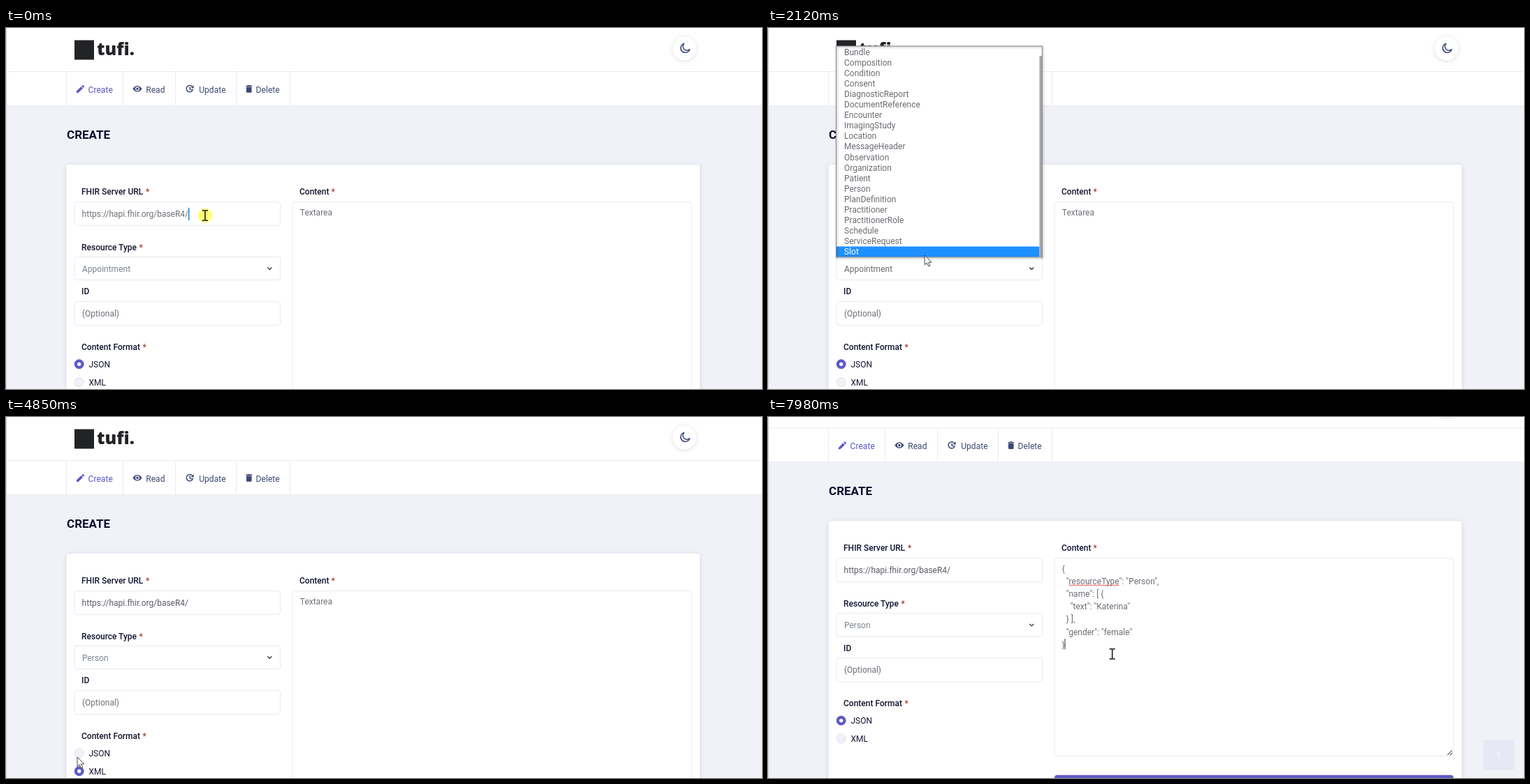
Animation of 1082 by 518 pixels, one loop 8000 ms. Source, as an HTML page:

```html
<!DOCTYPE html>
<html lang="en">
<head>
<meta charset="utf-8">
<title>Create resource</title>
<style>
  html, body { margin: 0; width: 100%; height: 100%; overflow: hidden; background: #f1f2f8; }
  svg { display: block; width: 1082px; height: 518px; font: 12px Roboto, sans-serif; }
  text { white-space: pre; }
  .label { font-weight: 500; fill: #12142f; }
  .star { fill: #b03a2e; }
  .field { fill: #fff; stroke: #e9eaf1; }
  .rule { stroke: #ebecf1; fill: none; }
  .value { fill: #6d6f77; }
  .icon { fill: none; stroke: #3d4976; stroke-width: 1.5; }
  .shadow { filter: drop-shadow(0 1px 3px rgba(40, 50, 90, .16)); }
</style>
</head>
<body>
<svg viewBox="0 0 1082 518">
  <defs>
    <clipPath id="selClip"><rect id="selClipBox" y="258" height="18"/></clipPath>
    <clipPath id="listClip"><rect x="98" y="26.5" width="294" height="302.5"/></clipPath>
  </defs>
  <rect width="1082" height="518" fill="#f1f2f8"/>

  <g id="page">
    <rect width="1082" height="111" fill="#fff"/>
    <path class="rule" d="M0 62.5H1082M0 111.5H1082"/>
    <rect x="98" y="17.5" width="28" height="28" fill="#222326"/>
    <text x="130" y="39" font-family="Open Sans, sans-serif" font-weight="800" font-size="25" fill="#222326">tufi.</text>
    <circle class="shadow" cx="971" cy="29.5" r="17" fill="#fff"/>
    <path class="icon" d="M970.4 22.4A6.6 6.6 0 1 0 978.6 30.6A5.8 5.8 0 0 1 970.4 22.4Z" stroke-linejoin="round"/>

    <g id="nav"></g>
    <g fill="#5a54c4">
      <path d="M101 90.6L107.6 84L110 86.4L103.4 93H101ZM108.3 83.3L109.5 82.1Q110 81.7 110.5 82.1L111.9 83.5Q112.3 84 111.9 84.5L110.7 85.7Z"/>
    </g>
    <path d="M181.4 87.3Q184.2 83 188 83T194.6 87.3Q191.8 91.6 188 91.6T181.4 87.3Z" fill="#3d4976"/>
    <circle cx="188" cy="87.3" r="2.4" fill="#3d4976" stroke="#fff" stroke-width="1.2"/>
    <path class="icon" d="M267.6 87.7A4.7 4.7 0 1 1 266.4 83.9M263.2 84.6V87.6L265.8 89.1" stroke-width="1.2"/>
    <path d="M268.6 82V86.2H264.4Z" fill="#3d4976"/>
    <path d="M343.4 82.6H345.8L346.4 82H349.2L349.8 82.6H352.2V83.9H343.4ZM344 84.5H351.6V91.5Q351.6 92.7 350.4 92.7H345.2Q344 92.7 344 91.5Z" fill="#3d4976"/>

    <text x="87" y="158.7" font-size="17" font-weight="600" fill="#0f1130">CREATE</text>
    <rect class="shadow" x="86.5" y="196" width="906.5" height="500" rx="4" fill="#fff"/>

    <g id="labels"></g>
    <rect class="field" x="98" y="249.5" width="294.5" height="34" rx="4"/>
    <rect class="field" x="98" y="328.5" width="294.5" height="33" rx="3"/>
    <rect class="field" x="98" y="392.5" width="294.5" height="34" rx="4"/>
    <rect class="field" x="410" y="249.5" width="571" height="283.5" rx="4"/>
    <path d="M972.5 531.5L979 525M976 532L979.5 528.5" stroke="#555" stroke-width="1.1"/>

    <text id="url" x="108.6" y="270.6">https://hapi.fhir.org/baseR4/</text>
    <rect id="selBox" y="258" height="18" fill="#0078d7"/>
    <text x="108.6" y="270.6" fill="#fff" clip-path="url(#selClip)">https://hapi.fhir.org/baseR4/</text>
    <path id="urlCaret" d="M262.5 259V274" stroke="#222"/>

    <text id="choice" x="109" y="349.7"></text>
    <path d="M374.3 343.6L377.3 346.6L380.3 343.6" fill="none" stroke="#3a3d46" stroke-width="1.4"/>
    <text class="value" x="109" y="414">(Optional)</text>
    <g id="radios"></g>

    <text id="hint" class="value" x="420.8" y="268.6">Textarea</text>
    <g id="json" class="value"></g>
    <path id="squiggle" fill="none" stroke="#e0483f"/>
    <path id="caretTop" d="M421.5 256V271" stroke="#222"/>
    <path id="caretEnd" d="M425 365V380" stroke="#222"/>
    <rect x="410" y="560.5" width="571" height="35" rx="4" fill="#5f5ac6"/>
  </g>

  <g id="toTop">
    <rect x="1024" y="463" width="44" height="44" rx="3" fill="#5f5ac6"/>
    <path d="M1046 490V481M1042 485L1046 481L1050 485" fill="none" stroke="#fff" stroke-width="1.5"/>
  </g>
  <path d="M.5 0V518" stroke="#cfcfd4"/>

  <g id="popup">
    <rect id="popFill" x="97.5" y="26" width="295" height="303" fill="#fff"/>
    <g id="list" clip-path="url(#listClip)">
      <rect id="rowMark" x="98" width="290.5" height="15.1" fill="#1e90ff"/>
      <g id="rows"></g>
      <rect id="thumb" x="388.5" width="3.5" height="288.5" fill="#a9a9a9"/>
    </g>
    <rect x="97.5" y="26" width="295" height="303" fill="none" stroke="#8b8b8b" style="filter:drop-shadow(1px 1px 1.5px rgba(0,0,0,.45))"/>
  </g>

  <g id="mouse">
    <circle id="press" r="10.3" fill="#ffff00" fill-opacity=".52"/>
    <path id="arrow" d="M0 0V13.6L3.2 10.7L5.4 15.7L7.6 14.8L5.5 9.9H9.8Z" fill="#fff" stroke="#333" stroke-width=".9"/>
    <path id="beam" d="M-4 -7.3H-1.2L0 -6.5L1.2 -7.3H4M0 -6.5V6.5M-4 7.3H-1.2L0 6.5L1.2 7.3H4" fill="none" stroke="#111" stroke-width="1.5"/>
  </g>
</svg>

<script>
const LOOP = 8000, ROW = 15.1, LIST_TOP = 26.6, LIST_END = 329;
const $ = id => document.getElementById(id);
const set = (el, attrs) => { for (const k in attrs) el.setAttribute(k, attrs[k]); return el; };
const add = (parent, tag, attrs, text) => {
  const el = set(document.createElementNS('http://www.w3.org/2000/svg', tag), attrs);
  if (text !== undefined) el.textContent = text;
  parent.appendChild(el);
  return el;
};
const show = (id, on) => $(id).setAttribute('visibility', on ? 'visible' : 'hidden');
const within = (t, a, b) => t >= a && t < b;

for (const x of [86.5, 167.5, 242.5, 329.5, 406.5])
  add($('nav'), 'path', { class: 'rule', d: `M${x} 63V111` });
[['Create', 117.6], ['Read', 200.2], ['Update', 276.2], ['Delete', 357.6]].forEach(([name, x], i) =>
  add($('nav'), 'text', { x, y: 92.7, 'font-size': 12.1, fill: i ? '#3d4976' : '#5a54c4' }, name));

[['FHIR Server URL', 108, 239, 200], ['Resource Type', 108, 318.5, 190.5], ['ID', 108, 382.4],
 ['Content Format', 108, 461.7, 195.5], ['Content', 420, 239, 465.5]].forEach(([name, x, y, star]) => {
  add($('labels'), 'text', { class: 'label', x, y }, name);
  if (star) add($('labels'), 'text', { class: 'label star', x: star, y }, '*');
});

const radios = [['JSON', 482.3], ['XML', 508.2]].map(([name, y]) => {
  add($('radios'), 'text', { x: 118.5, y: y + 4.3, fill: '#12142f' }, name);
  return {
    ring: add($('radios'), 'circle', { cx: 104.7, cy: y, r: 6.5 }),
    dot: add($('radios'), 'circle', { cx: 104.7, cy: y, r: 2.6, fill: '#fff' })
  };
});

const types = ('Appointment Bundle Composition Condition Consent DiagnosticReport DocumentReference ' +
  'Encounter ImagingStudy Location MessageHeader Observation Organization Patient Person PlanDefinition ' +
  'Practitioner PractitionerRole Schedule ServiceRequest Slot').split(' ');
const rows = types.map((name, i) =>
  add($('rows'), 'text', { x: 109, y: LIST_TOP + ROW * i + 12 }, name));

['{', '  "resourceType": "Person",', '  "name": [ {', '    "text": "Katerina"', '  } ],',
 '  "gender": "female"', '}'].forEach((line, i) =>
  add($('json'), 'text', { x: 420.8, y: 268.4 + 18.17 * i }, line));
$('squiggle').setAttribute('d', 'M430.5 289' + 'l1.5 -1.5l1.5 1.5'.repeat(24));

// Pointer stops: time, x, y
const path = [
  [30, 285, 269], [640, 94, 275], [1040, 94, 275], [1360, 217, 351], [1970, 217, 351],
  [2440, 247, 249], [2590, 249, 235], [3010, 249, 235], [3530, 155, 442], [3760, 121, 483],
  [3860, 121, 483], [4130, 104, 508], [4480, 104, 508], [4640, 103, 500], [4850, 102, 488],
  [4960, 103, 483], [5480, 103, 483], [5930, 492.7, 340]
];
const presses = [[0, 850], [1600, 1670], [2870, 3010], [4230, 4370], [5010, 5110], [6020, 6130]];
const smooth = u => u * u * (3 - 2 * u);

function pointer(t) {
  const i = path.findIndex(p => p[0] > t);
  if (i === 0) return path[0].slice(1);
  if (i < 0) return path[path.length - 1].slice(1);
  const [t0, x0, y0] = path[i - 1], [t1, x1, y1] = path[i];
  const u = smooth((t - t0) / (t1 - t0));
  return [x0 + (x1 - x0) * u, y0 + (y1 - y0) * u];
}

const inField = (x, y) =>
  (within(x, 98, 392) && (within(y, 250, 283) || within(y, 393, 426))) ||
  (within(x, 410, 981) && within(y, 250, 533));

// Left edge of the selection, snapped to a character
function selectionStart(x) {
  const url = $('url'), n = url.getNumberOfChars();
  for (let i = 0; i < n; i++) {
    const a = url.getStartPositionOfChar(i).x, b = url.getEndPositionOfChar(i).x;
    if (x < (a + b) / 2) return a;
  }
  return url.getEndPositionOfChar(n - 1).x;
}

function drawForm(t, x) {
  const end = 262.4;
  const start = t < 1600 ? selectionStart(t < 640 ? x : 0) : end;
  const width = Math.max(0, end - start);
  for (const id of ['selBox', 'selClipBox']) set($(id), { x: start, width });
  show('urlCaret', t < 1600 && width < 1);
  set($('url'), { fill: t < 1600 ? '#6d6f77' : '#595c66' });

  $('choice').textContent = t < 3010 ? 'Appointment' : 'Person';
  set($('choice'), { fill: within(t, 1600, 4230) ? '#6a6a6f' : '#7c8494' });

  const picked = within(t, 4370, 5110) ? 1 : 0;
  radios.forEach(({ ring, dot }, i) => {
    const on = i === picked;
    set(ring, { fill: on ? '#5f5ac6' : '#f1f1f7', stroke: on ? '#5f5ac6' : '#e2e3ec' });
    set(dot, { visibility: on ? 'visible' : 'hidden' });
  });

  show('hint', t < 6820);
  show('json', t >= 6820);
  show('squiggle', t >= 6850);
  show('caretTop', within(t, 6020, 6520));
  show('caretEnd', within(t, 6820, 7390) || t >= 7870);
}

function drawPopup(t, y) {
  $('popup').style.display = within(t, 1600, 3010) ? '' : 'none';
  const alpha = t < 1630 ? 0 : t < 1670 ? 0.5 : 1;
  set($('popFill'), { opacity: alpha });
  set($('list'), { opacity: alpha });
  const inside = y < LIST_END, shift = inside ? 1 : 0;
  const row = inside ? Math.floor((y - LIST_TOP) / ROW) + 1 : 0;
  set($('rowMark'), { y: LIST_TOP + ROW * (row - shift) });
  set($('rows'), { transform: `translate(0 ${-ROW * shift})` });
  set($('thumb'), { y: inside ? 40 : 26.5 });
  rows.forEach((el, i) => set(el, { fill: i === row ? '#fff' : '#6b6c73' }));
}

function draw(t) {
  const [x, y] = pointer(t);
  drawForm(t, x);
  drawPopup(t, y);

  const u = Math.max(0, Math.min(t, 7980) - 7860) / 228;
  const scroll = 86.6 * smooth(u);
  set($('page'), { transform: `translate(0 ${-scroll})` });
  set($('toTop'), { opacity: scroll / 46.5 * 0.06 });

  const beam = inField(x, y) && !within(t, 1600, 3010);
  set($('mouse'), { transform: `translate(${x} ${y})` });
  show('beam', beam);
  show('arrow', !beam);
  show('press', presses.some(([a, b]) => within(t, a, b)));
}

const began = performance.now();
function tick() {
  draw((performance.now() - began) % LOOP);
  requestAnimationFrame(tick);
}
tick();
</script>
</body>
</html>
```
